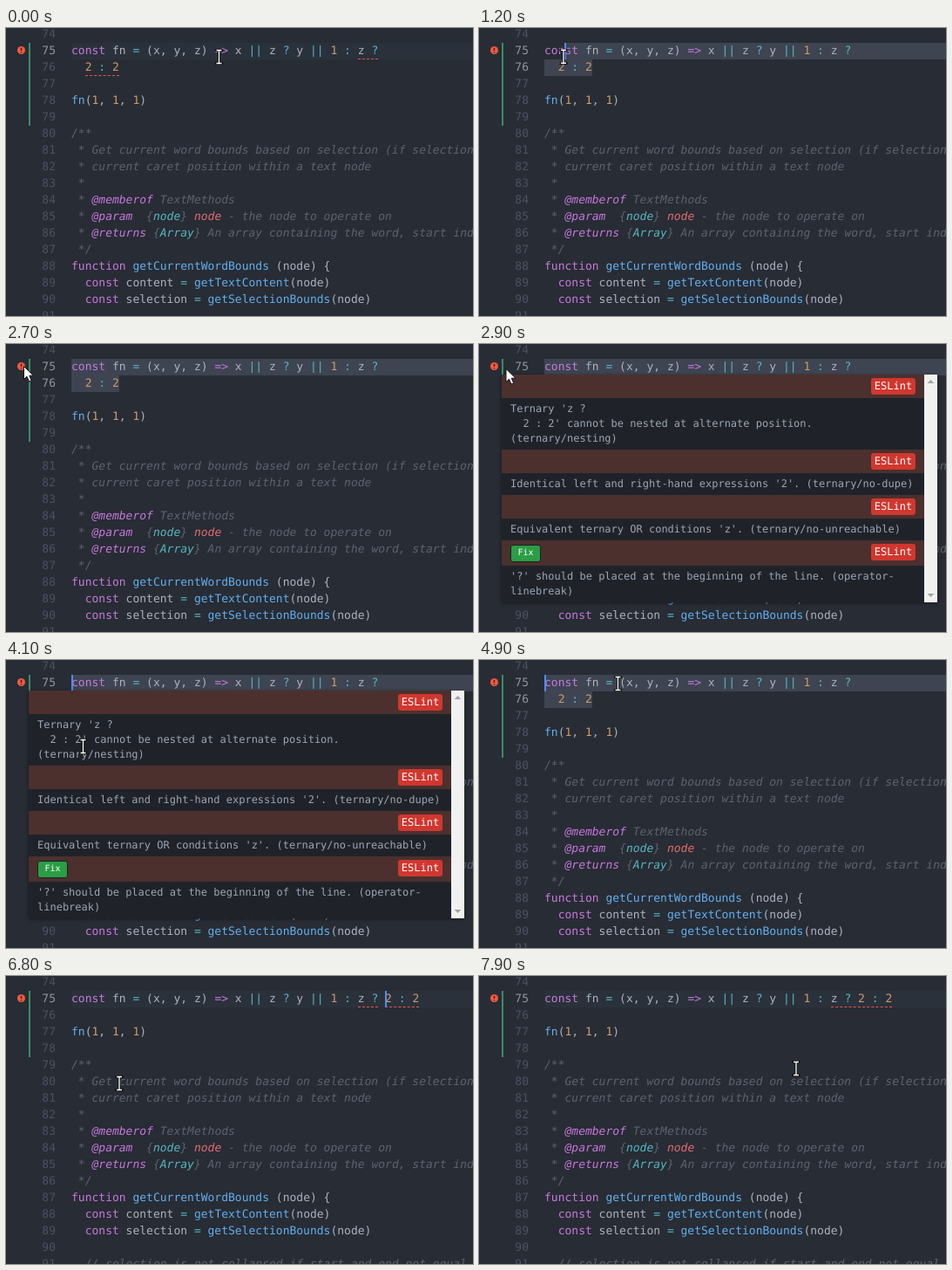
Write an HTML page that moves like this. It is 536 px wide and 330 px high and loops after 8000 ms.

```html
<!DOCTYPE html>
<html lang="en">
<head>
<meta charset="utf-8">
<title>Editor with lint messages</title>
<style>
html, body { margin: 0; width: 100%; height: 100%; overflow: hidden; background: #282c34; }
#stage {
  position: relative; width: 536px; height: 330px; overflow: hidden;
  font: 13px/19px "DejaVu Sans Mono", monospace; color: #abb2bf;
  white-space: pre; text-rendering: geometricPrecision;
}
#stage > *, .row, .sel, .lint, .caret { position: absolute; left: 0; top: 0; }
#stage > #numbers { left: 28px; top: -2px; width: 29px; text-align: right; color: #4b5263; }
#stage > #code { left: 75px; top: -2px; }
#numbers p, #code p { margin: 0; height: 19px; }
#numbers .on { color: #8f96a3; }
.p { color: #c678dd } .c { color: #56b6c2 } .o { color: #d19a66 }
.b { color: #61afef } .r { color: #e06c75 }
.k { color: #5c6370; font-style: italic }
.row, .sel, .lint, .caret { box-sizing: border-box; height: 19px; }
.row { background: #2a313b; }
.sel { background: #3e4451; }
.lint { border-bottom: 1px dashed #e0574a; }
.caret { background: #528bff; }
#stage > #added { left: 26px; top: 17px; width: 2px; background: #348f66; }
#stage > #popup {
  left: 26px; top: 35px; width: 500px; height: 261px; background: #1f2329; color: #9da5b4;
  font-size: 12px; line-height: 17px; box-shadow: 0 1px 4px rgba(0,0,0,.45);
}
.head { position: relative; width: 485px; height: 27px; background: #4b302e; }
.head.fixable { height: 29px; }
.msg { padding: 4px 10px; }
.badge, .fix { position: absolute; box-sizing: border-box; text-align: center; border-radius: 3px; color: #fff; }
.badge { right: 10px; top: 4px; width: 51px; height: 19px; line-height: 19px; background: #d0372f; }
.fix { left: 10px; top: 5px; width: 35px; height: 20px; line-height: 18px; font-size: 10px; background: #2a9d45; border: 1px solid #1c2024; }
#bar { position: absolute; right: 0; top: 0; width: 15px; height: 261px; background: #f1f1f1; }
</style>
</head>
<body>
<div id="stage">
  <div id="under"></div>
  <div id="added"></div>
  <svg width="30" height="40">
    <circle cx="17.5" cy="25.5" r="4.5" fill="#f2593f"/>
    <path d="M17.5 22.8V26M17.5 27.2V28.5" stroke="#282c34" stroke-width="1.4"/>
  </svg>
  <div id="numbers"></div>
  <div id="code"></div>
  <div id="top"></div>
  <div id="popup"></div>
  <svg id="mouse" width="40" height="40" viewBox="-20 -20 40 40">
    <g id="beam" fill="none">
      <path d="M-3-7.5H3M0-7.5V7.5M-3 7.5H3" stroke="#111" stroke-width="3.2" stroke-linecap="square"/>
      <path d="M-3-7.5H3M0-7.5V7.5M-3 7.5H3" stroke="#fff" stroke-width="1.3"/>
    </g>
    <path id="arrow" d="M.5.5V15.5L4 12.2L6.5 18L9.2 16.8L6.8 11.2H11.5Z" fill="#fff" stroke="#111"/>
  </svg>
</div>
<script>
const $ = id => document.getElementById(id);
const LOOP = 8000, TICK = 100, BLINK = 400;
const CHAR = 13 * 1233 / 2048, LEFT = 75, TOP = 17, PITCH = 19, WIDTH = 536, ROWS = 18;

// ~x...~ colours a run with class x
const paint = s => s.replace(/~(\w)(.*?)~/g, '<span class="$1">$2</span>');
const comment = s => `<span class="k">${paint(s)}</span>`;

const FIRST = '~pconst~ fn ~c=~ (x, y, z) ~p=&gt;~ x ~c||~ z ~c?~ y ~c||~ ~o1~ ~c:~ z ~c?~ ';
const SECOND = '~o2~ ~c:~ ~o2~';
const REST = [
  '', '~bfn~(~o1~, ~o1~, ~o1~)', '',
  ...[
    '/**',
    ' * Get current word bounds based on selection (if selection',
    ' * current caret position within a text node',
    ' *',
    ' * ~p@memberof~ TextMethods',
    ' * ~p@param~  {~cnode~} ~rnode~ - the node to operate on',
    ' * ~p@returns~ {~cArray~} An array containing the word, start index',
    ' */'
  ].map(comment),
  '~pfunction~ ~bgetCurrentWordBounds~ (node) {',
  '  ~pconst~ content ~c=~ ~bgetTextContent~(node)',
  '  ~pconst~ selection ~c=~ ~bgetSelectionBounds~(node)',
  '', '  ' + comment('// selection is not collapsed if start and end not equal')
];

const DRAG = 1000, DROP = 1400, DRAG_END = 1500, OPEN = 2900, CLOSE = 4800,
  CLICK = 5000, CLICK_BELOW = 5900, UNINDENT = 6600, JOIN = 6800, RELINT = 7400;

// first and last step of each glide, and where it ends
const GLIDES = [
  [300, 400, 178.5, 42], [600, 700, 160, 50], [DRAG, DRAG_END, 76, 27], [1800, 2000, 185.5, 20],
  [2200, 2700, 20, 25], [OPEN, OPEN, 30.5, 28], [3000, 3000, 14, 22],
  [3800, 4100, 88.5, 99], [4200, 4400, 115, 190], [4600, 4900, 159.5, 27],
  [5300, 5400, 169, 67], [5600, 6000, 88.5, 46], [6200, 6300, 130, 123], [7600, 7900, 364, 106]
];

function mouseAt(t) {
  const now = Math.floor(t / TICK) * TICK;
  let x = 244.5, y = 33;
  for (const [first, last, toX, toY] of GLIDES) {
    if (now < first) break;
    const p = Math.min(1, (now - first + TICK) / (last - first + TICK));
    const eased = 1 - (1 - p) ** 2;
    x += (toX - x) * eased;
    y += (toY - y) * eased;
  }
  return { x, y };
}

function caretFromMouse(t) {
  const { x, y } = mouseAt(t);
  const col = Math.max(0, Math.round((x - LEFT) / CHAR));
  return y < TOP + PITCH ? { row: 0, col } : { row: 1, col: Math.min(col, 7) };
}

function caretAt(t) {
  if (t < DRAG) return { row: 0, col: 21 };
  if (t < CLICK) return caretFromMouse(Math.min(t, DRAG_END));
  if (t < CLICK_BELOW) return caretFromMouse(CLICK);
  if (t < UNINDENT) return caretFromMouse(CLICK_BELOW);
  return t < JOIN ? { row: 1, col: 0 } : { row: 0, col: 46 };
}

function caretLit(t) {
  const action = [DRAG, DROP, CLICK, CLICK_BELOW, UNINDENT].filter(a => a <= t).pop();
  return action !== undefined && (t - action) % (2 * BLINK) < BLINK;
}

const box = (cls, x, row, w) =>
  `<div class="${cls}" style="left:${x}px;top:${TOP + row * PITCH}px;width:${w}px"></div>`;
const cells = (cls, row, from, to) => box(cls, LEFT + from * CHAR, row, (to - from) * CHAR);

function put(id, html) {
  const el = $(id);
  if (el.shown !== html) el.innerHTML = el.shown = html;
}

function background(t, { row, col }, selecting, indent) {
  const x = LEFT + col * CHAR;
  const lint = t >= RELINT ? cells('lint', 0, 42, 51)
    : cells('lint', 0, 42, 45) +
      (t >= JOIN ? cells('lint', 0, 46, 51) : cells('lint', 1, indent, indent + 5));
  if (!selecting) return box('row', LEFT, row, WIDTH - LEFT) + lint;
  return lint + (row ? cells('sel', 1, col, 7) : box('sel', x, 0, WIDTH - x) + cells('sel', 1, 0, 7));
}

function draw(t) {
  const caret = caretAt(t), { row, col } = caret;
  const selecting = t >= DRAG && t < CLICK;
  const joined = t >= JOIN, indent = t < UNINDENT ? 2 : 0;
  const lastRow = selecting ? 1 : row;

  const lines = joined
    ? ['', FIRST + SECOND, ...REST]
    : ['', FIRST, ' '.repeat(indent) + SECOND, ...REST];
  put('code', lines.slice(0, ROWS).map(s => `<p>${paint(s)}</p>`).join(''));
  put('numbers', Array.from({ length: ROWS }, (_, i) =>
    `<p class="${i > row && i <= lastRow + 1 ? 'on' : ''}">${74 + i}</p>`).join(''));
  put('under', background(t, caret, selecting, indent));
  put('top', caretLit(t) ? box('caret', Math.round(LEFT + col * CHAR), row, 2) : '');
  $('added').style.height = PITCH * (joined ? 4 : 5) + 'px';
  $('popup').style.display = t >= OPEN && t < CLOSE ? '' : 'none';

  const { x, y } = mouseAt(t), inGutter = x < LEFT;
  $('mouse').style.transform = `translate(${x - 20}px,${y - 20}px)`;
  $('beam').style.display = inGutter ? 'none' : '';
  $('arrow').style.display = inGutter ? '' : 'none';
}

const message = (text, fixable) =>
  `<div class="head ${fixable ? 'fixable' : ''}">${fixable ? '<div class="fix">Fix</div>' : ''}` +
  `<div class="badge">ESLint</div></div><div class="msg">${text}</div>`;
$('popup').innerHTML =
  message("Ternary 'z ?\n  2 : 2' cannot be nested at alternate position.\n(ternary/nesting)") +
  message("Identical left and right-hand expressions '2'. (ternary/no-dupe)") +
  message("Equivalent ternary OR conditions 'z'. (ternary/no-unreachable)") +
  message("'?' should be placed at the beginning of the line. (operator-\nlinebreak)", true) +
  '<svg id="bar" viewBox="0 0 15 261"><path d="M3.5 10L7.5 6L11.5 10ZM3.5 251L7.5 255L11.5 251Z" fill="#a3a3a3"/></svg>';

function tick() {
  draw(performance.now() % LOOP);
  requestAnimationFrame(tick);
}
tick();
</script>
</body>
</html>
```
